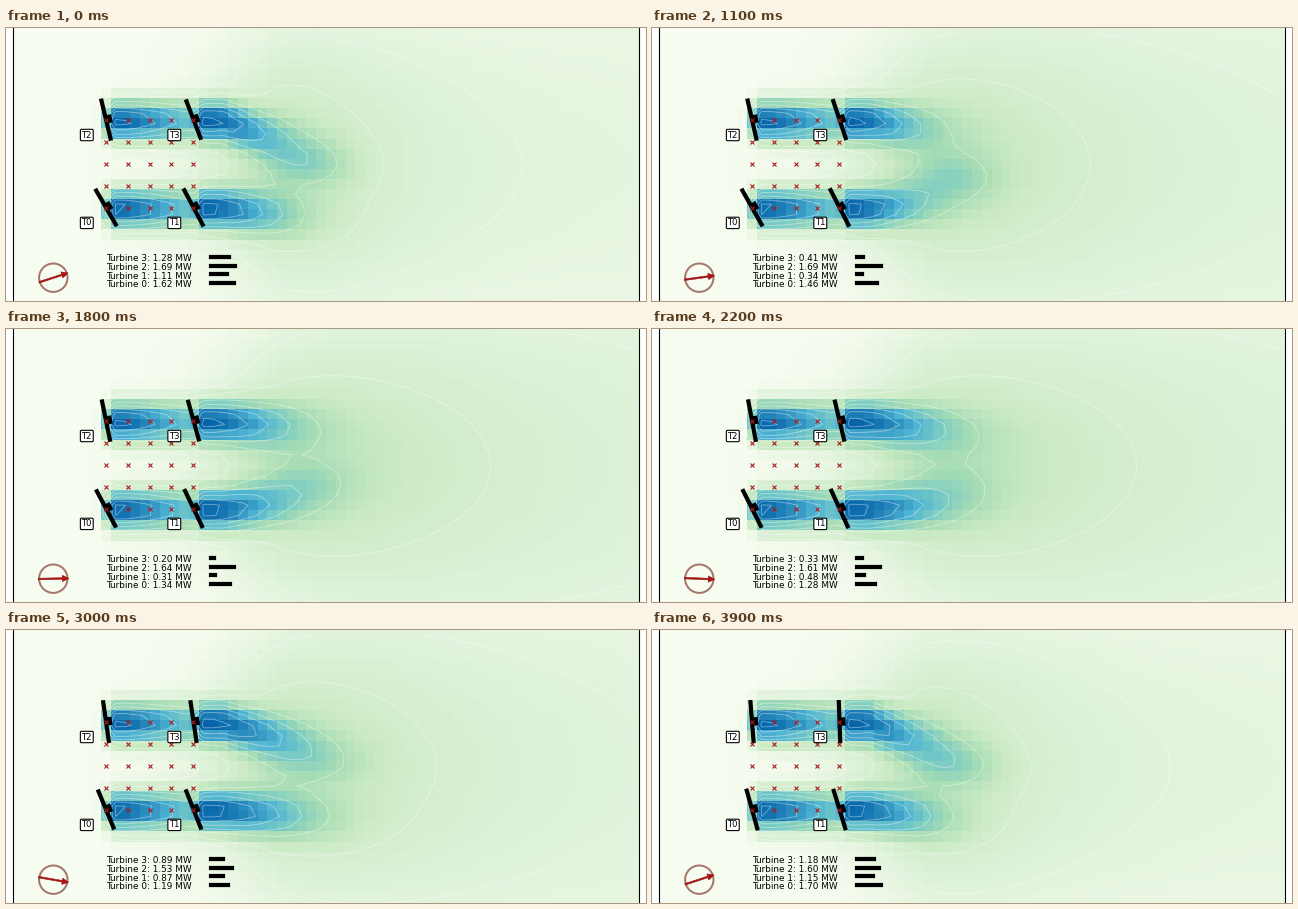
Animation, 640 px wide and 273 px high, one loop 4000 ms. Source, as a matplotlib script:

```python
import numpy as np
import matplotlib.pyplot as plt
from matplotlib.animation import FuncAnimation
from matplotlib.patches import Circle, Polygon

W, H, DPI = 640, 273, 100
FRAMES, INTERVAL = 40, 100
SWEEP = FRAMES - 1                  # steps before the wind snaps back
PT = 72 / DPI                       # points per pixel

LEFT, RIGHT = 7, 633
COLS, ROWS = 64, 28
TOP, CELL_H = -0.5, 10.1
MID_Y = 137

X_FRONT, X_REAR = 100, 187.5
Y_LOW, Y_HIGH = 179.5, 91.6
TURBINES = [(X_FRONT, Y_LOW), (X_REAR, Y_LOW),
            (X_FRONT, Y_HIGH), (X_REAR, Y_HIGH)]

# Yaw as (start, drop, ease power); shading as (worst wind angle, loss).
YAW = [(30, 14.5, 2.5), (28, 11, 2), (13.5, 9, 2), (21, 19, 1.6)]
SHADE = [(0, 0), (4.5, 0.82), (0, 0), (2.2, 0.88)]

cell_w = (RIGHT - LEFT) / COLS
xc = LEFT + cell_w * (np.arange(COLS) + 0.5)
yc = TOP + CELL_H * (np.arange(ROWS) + 0.5)
X, Y = np.meshgrid(xc, yc)


def swing(k, peak):
    """One cosine cycle per loop, highest at the given step."""
    return np.cos(2 * np.pi * (k - peak) / FRAMES)


def yaw(i, k):
    start, drop, power = YAW[i]
    return start - drop * (k / SWEEP) ** power


def wind(k):
    return 18 - 0.93 * (k % SWEEP)


def output(i, k):
    worst, loss = SHADE[i]
    facing = np.cos(np.radians(wind(k) - yaw(i, k))) ** 2.1
    return 1.7 * facing * (1 - loss * np.exp(-((wind(k) - worst) / 14) ** 2))


def wake(x0, y0, decay, bend=0):
    """Deficit behind one rotor, with a downstream drift of its axis."""
    dx = X - x0
    behind = np.clip(dx, 0, None)
    onset = 1 / (1 + np.exp(-(dx + 1) / 2.5))
    axis = y0 + bend * np.clip((dx - 30) / 80, 0, 1.8)
    spread = 14 + 6 * onset + 0.02 * behind
    across = np.exp(-np.abs((Y - axis) / spread) ** 2.3)
    return 0.9 * onset * decay(behind) * across


def plume(tip):
    """Broad merged wake that fades out past the tip."""
    rise = 1 / (1 + np.exp(-(X - 220) / 32))
    past = np.clip((X - 270) / (tip - 270), 0, None)
    along = rise * (0.09 + 0.27 * np.exp(-0.9 * past ** 1.1))
    width = 70 + 0.32 * np.clip(X - 100, 0, None)
    return along * np.exp(-((Y - MID_Y) / width) ** 2)


def flow_field(k):
    length = 90 - 14 * swing(k, 8)
    y_low, y_high = Y_LOW + 1.5, Y_HIGH + 1.5

    def slow(d):
        return 1 / (1 + (d / 94) ** 2.1)

    def fast(d):
        return np.exp(-(d / length) ** 2.2)

    wakes = np.max([
        wake(X_FRONT, y_low, slow) * (X < X_REAR + 20),
        wake(X_FRONT, y_high, slow) * (X < X_REAR + 20),
        wake(X_REAR, y_low, fast, 10 * swing(k, 36)),
        wake(X_REAR, y_high, fast, 16 + 12 * swing(k, 37)),
    ], axis=0)
    merge_y = 143 - 8 * swing(k, 36)
    merge = (0.16 + 0.08 * swing(k, 6)) * np.exp(
        -((X - 300) / 42) ** 2 - ((Y - merge_y) / 24) ** 2)
    tip = 430 - 58 * swing(k, 0)
    return 1 - (1 - plume(tip)) * (1 - wakes) * (1 - merge)


fig = plt.figure(figsize=(W / DPI, H / DPI), dpi=DPI, facecolor="white")
ax = fig.add_axes([0, 0, 1, 1])
ax.axis("off")

image = ax.imshow(flow_field(0), cmap="GnBu", vmin=0, vmax=1,
                  extent=[LEFT, RIGHT, TOP + ROWS * CELL_H, TOP],
                  interpolation="nearest", aspect="auto")
ax.set_xlim(0, W)
ax.set_ylim(H, 0)

for x in (LEFT, RIGHT):
    ax.plot([x, x], [-2, H + 2], color="black", lw=0.8, zorder=3)


def thick_line(width, cap="projecting"):
    return ax.plot([], [], color="black", lw=width * PT,
                   solid_capstyle=cap, zorder=5)[0]


blades = [thick_line(4.2) for _ in TURBINES]
hubs = [thick_line(8.3, "butt") for _ in TURBINES]
bars = [thick_line(4.2) for _ in TURBINES]

gx, gy = np.meshgrid(np.linspace(X_FRONT, 187, 5), np.linspace(92, 180, 5))
ax.plot(gx.ravel(), gy.ravel(), "x", color="#a81c1c", ms=4.2 * PT,
        mew=1.1 * PT, zorder=6)

for i, (x, y) in enumerate(TURBINES):
    ax.text(x - 19.2, y + 15.4, f"T{i}", fontsize=8.5 * PT, ha="center",
            va="center", zorder=7,
            bbox=dict(boxstyle="round,pad=0.14", fc="white", ec="black",
                      lw=1.1 * PT))

labels = [ax.text(100, 259.2 - 8.67 * i, "", fontsize=8.9 * PT,
                  va="baseline", zorder=7) for i in range(4)]

DIAL = np.array([47.3, 249.7])
ax.add_patch(Circle(DIAL, 14.2, fill=False, ec="#a6766c", lw=2 * PT, zorder=4))
ARROW = np.array([(-15, -0.8), (9, -0.8), (9, -3.2), (15.5, 0),
                  (9, 3.2), (9, 0.8), (-15, 0.8)])
needle = ax.add_patch(Polygon(ARROW, fc="#b01212", ec="#8f1010", lw=0.5 * PT,
                              zorder=5))

LEVELS = [0.115, 0.2] + list(np.arange(0.36, 0.9, 0.12))
lines = None


def draw(k):
    global lines
    field = flow_field(k)
    image.set_data(field)
    if lines is not None:
        lines.remove()
    lines = ax.contour(xc, yc, field, LEVELS, colors="white", alpha=0.4,
                       linewidths=0.9 * PT, zorder=2)

    for i, (x, y) in enumerate(TURBINES):
        a = np.radians(yaw(i, k))
        s, c = np.sin(a), np.cos(a)
        blades[i].set_data([x - 19.5 * s, x + 19.5 * s],
                           [y - 19.5 * c, y + 19.5 * c])
        hubs[i].set_data([x, x + 6 * c], [y, y - 6 * s])
        power = output(i, k)
        labels[i].set_text(f"Turbine {i}: {power:.2f} MW")
        bars[i].set_data([205, 205 + 14 * power], [255 - 8.67 * i] * 2)

    a = np.radians(wind(k))
    turn = np.array([[np.cos(a), -np.sin(a)], [np.sin(a), np.cos(a)]])
    needle.set_xy(ARROW @ turn + DIAL)
    return [image]


anim = FuncAnimation(fig, draw, frames=FRAMES, interval=INTERVAL,
                     init_func=lambda: draw(0), repeat=True, repeat_delay=0,
                     blit=False)
plt.show()
```
